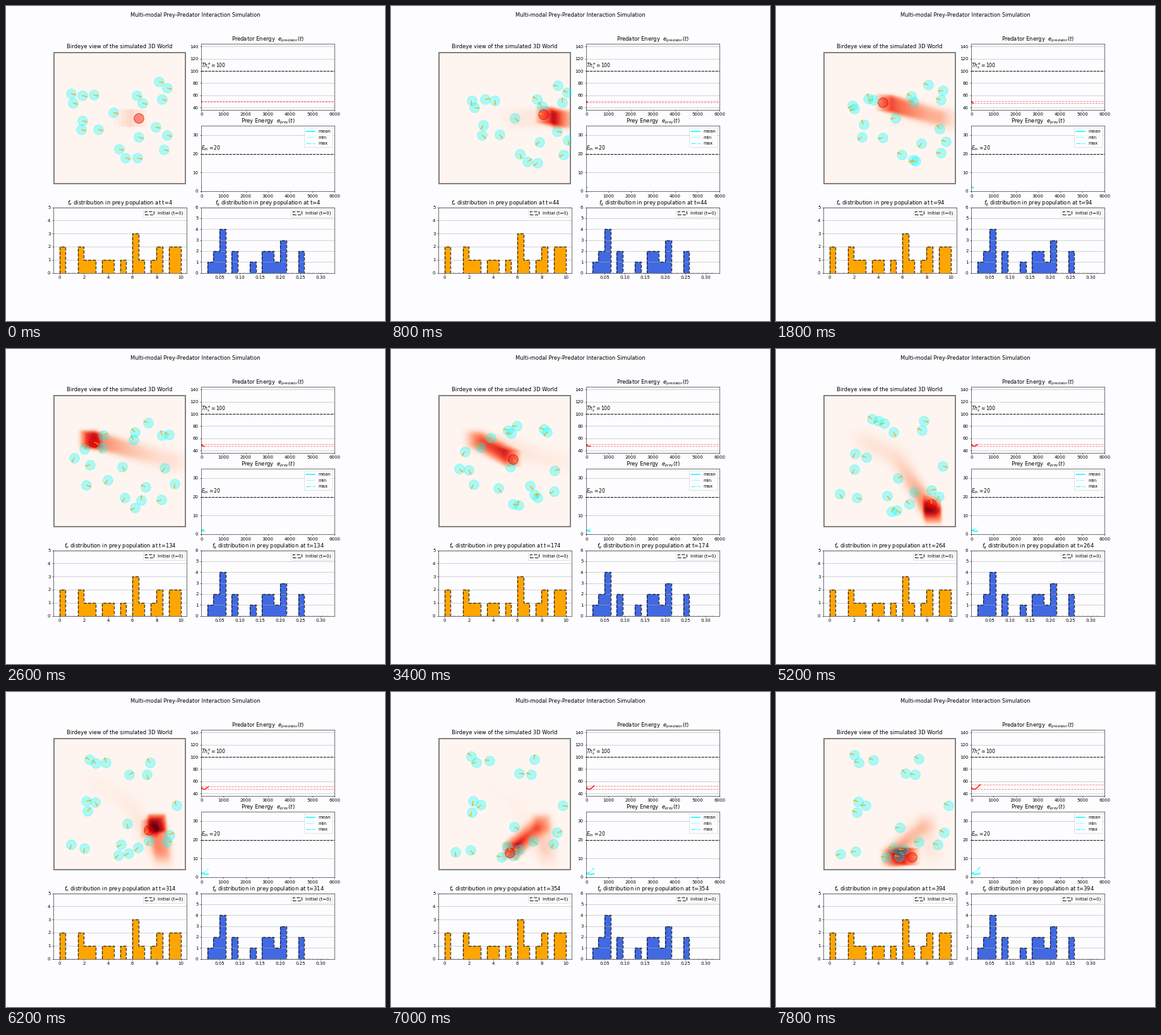
These frames come from a looping animation (600x500 px, 8000 ms). A matplotlib script:

```python
import numpy as np
import matplotlib.pyplot as plt
from matplotlib.animation import FuncAnimation

W, H, DPI = 600, 500, 50
FRAMES, STEP_MS, SUB = 40, 200, 10      # SUB simulation steps per frame
LAST = FRAMES - 1
PAPER = "#fdfdff"

plt.rcParams["axes.facecolor"] = PAPER
fig = plt.figure(figsize=(W / DPI, H / DPI), dpi=DPI, facecolor=PAPER)
fig.suptitle("Multi-modal Prey-Predator Interaction Simulation", y=0.98, fontsize=12)


def add_axes(x0, y0, x1, y1):
    return fig.add_axes([x0 / W, 1 - y1 / H, (x1 - x0) / W, (y1 - y0) / H])


# ---------- predator: straight runs between turning points (frame, x, y) ----------
TURNS = np.array([
    (-0.4, 184, 178), (0, 210, 178), (1, 270, 180), (2, 270, 180), (12, 126, 141),
    (17, 193, 175), (24.5, 250, 268), (28.6, 240, 208), (30, 238, 208),
    (31, 226, 219), (36, 178, 264), (39, 215, 262)])
X0, Y0, X1, Y1 = 76.5, 75.5, 282.5, 281     # floor of the world


def predator(k):
    return np.array([np.interp(k, TURNS[:, 0], TURNS[:, i]) for i in (1, 2)])


def scent_fields(n=104, half=14, gain=0.036, decay=0.981, spread=0.04):
    """Scent left in a square around the predator, spreading and fading."""
    gx = np.linspace(X0, X1, n)
    gy = np.linspace(Y0, Y1, n)[:, None]
    field, out = np.zeros((n, n)), []
    for s in range(-4, LAST * SUB + 1):
        x, y = predator(s / SUB)
        p = np.pad(field, 1, mode="edge")
        lap = p[:-2, 1:-1] + p[2:, 1:-1] + p[1:-1, :-2] + p[1:-1, 2:] - 4 * field
        field = decay * (field + spread * lap)
        field += gain * ((abs(gx - x) < half) & (abs(gy - y) < half))
        if s >= 0 and s % SUB == 0:
            out.append(field.clip(0, 1))
    return out


# ---------- prey: first and last place of each, the way between by rule ----------
START = np.array([
    (242, 120), (255, 130), (247, 148), (216, 154), (207, 142), (121, 142), (103, 139),
    (106, 154), (139, 141), (121, 182), (170, 169), (119, 196), (146, 196), (208, 241),
    (210, 208), (237, 192), (255, 205), (250, 228), (179, 227), (189, 241)])
END = np.array([
    (131, 112), (220, 131), (226, 106), (124, 100), (154, 108), (205, 129), (102, 257),
    (130, 174), (142, 180), (128, 191), (196, 215), (126, 253), (186, 247), (174, 262),
    (226, 238), (273, 180), (256, 242), (202, 250), (195, 261), (266, 223)])
phase = np.random.default_rng(4).uniform(0, 2 * np.pi, START.shape)


def herd(k):
    """All set off to the right, then curve over to their resting places."""
    u = np.clip(k / LAST, 0, 1)
    burst = k / 4 * np.exp(1 - k / 4) * np.array([25, 7])
    meander = 5 * np.sin(np.pi * u) ** 2 * np.sin(0.6 * k + phase)
    return START + (END - START) * u * u * (3 - 2 * u) + burst + meander


# ---------- world view ----------
world = add_axes(75, 73, 285, 282.5)
world.set_facecolor("gray")
for side in world.spines.values():
    side.set_visible(False)
fig.text(180 / W, 1 - 67 / H, "Birdeye view of the simulated 3D World",
         ha="center", va="baseline", fontsize=12)

scent = scent_fields()
floor = world.imshow(scent[0], cmap="Reds", vmin=0, vmax=1, aspect="auto",
                     extent=(X0, X1, Y1, Y0), interpolation="bilinear")
world.set(xlim=(75, 285), ylim=(282.5, 73), xticks=[], yticks=[])


def discs(points, face, edge):
    size = (15.5 * 72 / DPI) ** 2
    return world.scatter(*np.atleast_2d(points).T, s=size, facecolors=[face],
                         edgecolors=[edge], linewidths=1.4, zorder=3)


def everyone(k):
    return np.vstack([herd(k), predator(k)])


crowd = everyone(0)
prey_dots = discs(crowd[:-1], (0, 1, 1, 0.33), (0, 1, 1, 0.35))
pred_dot = discs(crowd[-1], (1, 0, 0, 0.42), (0.7, 0, 0, 0.6))
arrows = world.quiver(*crowd.T, np.ones(len(crowd)), np.zeros(len(crowd)),
                      color="orange", units="dots", width=1.2, scale_units="dots",
                      scale=1, headwidth=2.2, headlength=3, headaxislength=3, zorder=4)


# ---------- energy charts ----------
def energy(t):
    return 46.8 + np.where(t < 130, 3.2 * (1 - t / 130) ** 2,
                           7.8 * (abs(t - 130) / 264) ** 1.5)


def mean(t):
    return 1.6 + 0.6 * (t / 200 - 1) ** 2


def low(t):
    return 2 - t / 360


def high(t):
    return 2.2 + 3.5 * (t / 394) ** 2


def chart(box, title, ylim, yticks, level, label):
    ax = add_axes(*box)
    ax.set(xlim=(0, 6000), ylim=ylim, yticks=yticks)
    ax.set_title(title, fontsize=12)
    ax.grid(axis="y")
    ax.axhline(level, color="k", ls="--", lw=1.5)
    ax.text(0, level + (ylim[1] - ylim[0]) * 0.055, label, fontsize=11)
    return ax


top = chart((309.3, 60, 520.3, 164.5), r"Predator Energy  $e_{predator}(t)$",
            (36.4, 144.6), range(40, 141, 20), 100, r"$Th^e_s=100$")
mid = chart((309.3, 190, 520.3, 294), r"Prey Energy  $e_{prey}(t)$",
            (0, 35), range(0, 31, 10), 20, r"$E_{th}=20$")

curves = [(top.plot([], [], color="red", lw=2)[0], energy)]
bounds = [top.axhline(50, color="red", ls="--", lw=1.3, alpha=0.5) for _ in range(2)]
for rule, style, width in ((mean, "-", 2.2), (low, ":", 1.5), (high, "-.", 1.5)):
    name = {mean: "mean", low: "min", high: "max"}[rule]
    line, = mid.plot([], [], color="cyan", ls=style, lw=width, label=name)
    curves.append((line, rule))
mid.legend(loc="upper right")


# ---------- histograms ----------
def histogram(box, counts, lo, hi, color, ymax, xticks):
    ax = add_axes(*box)
    edges = np.linspace(lo, hi, len(counts) + 1)
    data = dict(x=edges[:-1] + np.diff(edges) / 2, bins=edges, weights=counts)
    pad = (hi - lo) / 20
    ax.hist(**data, color=color)
    ax.hist(**data, histtype="step", color="k", ls="--", lw=2, alpha=0.75,
            label="Initial (t=0)")
    ax.set(xlim=(lo - pad, hi + pad), ylim=(0, ymax), xticks=xticks,
           yticks=range(ymax + 1))
    ax.grid(axis="y")
    ax.legend(loc="upper right")
    return ax


hist_e = histogram((75.3, 319.5, 286.3, 423.5),
                   [2, 0, 0, 2, 1, 1, 0, 1, 1, 0, 1, 0, 3, 1, 0, 1, 2, 0, 2, 2],
                   0, 10, "orange", 5, range(0, 11, 2))
hist_g = histogram((309.3, 319.5, 520.3, 423.5),
                   [1, 2, 4, 0, 2, 0, 0, 1, 0, 2, 2, 1, 3, 0, 0, 2, 0, 0, 0, 0],
                   0.02, 0.32, "royalblue", 6, np.arange(1, 7) * 0.05)


def update(k):
    t = 4 + SUB * k
    floor.set_data(scent[k])

    crowd = everyone(k)
    prey_dots.set_offsets(crowd[:-1])
    pred_dot.set_offsets(crowd[-1:])
    arrows.set_offsets(crowd)
    dx, dy = (everyone(k + 0.05) - everyone(k - 0.05)).T
    angle = np.arctan2(dy, dx)
    arrows.set_UVC(8.5 * np.cos(angle), -8.5 * np.sin(angle))

    ts = np.arange(0, t + 1, 2)
    for line, rule in curves:
        line.set_data(ts, rule(ts))
    es = energy(ts)
    for line, v in zip(bounds, (es.min(), es.max())):
        line.set_ydata([v, v])

    for ax, name in ((hist_e, "f_e"), (hist_g, "f_g")):
        ax.set_title(f"${name}$ distribution in prey population at t={t}", fontsize=12)
    return []


anim = FuncAnimation(fig, update, frames=FRAMES, interval=STEP_MS,
                     init_func=lambda: update(0), repeat=True, repeat_delay=0)
plt.show()
```
